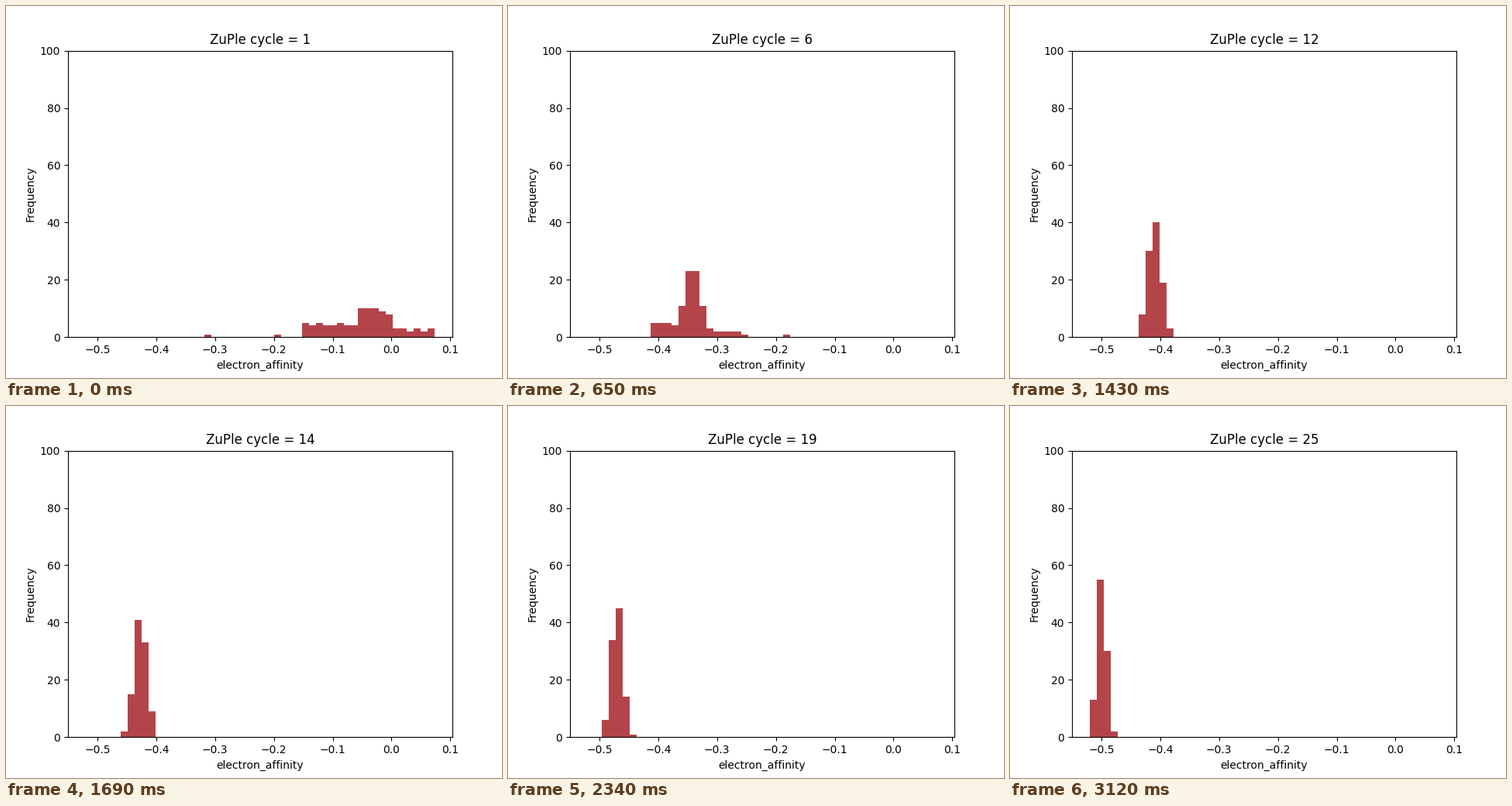
A matplotlib script that plays this animation: 640 px wide and 480 px high, repeating every 3250 ms.

```python
import numpy as np
import matplotlib.pyplot as plt
from matplotlib.animation import FuncAnimation

plt.rcParams["font.family"] = "DejaVu Sans"

CYCLES = 25
STEP_MS = 130
BINS = 50
LOW, HIGH = -0.52028, 0.07372
COLOR = "#b3444a"

RANK = np.arange(100)  # the 100 samples, sorted by value


def spread(points):
    """Sample positions, in bins, along a line through (rank, bin) points."""
    return np.interp(RANK, *zip(*points))


def bell(cycle):
    """Normal-like cluster that drifts left and narrows."""
    p = (RANK + 1) / 101
    z = (p ** 0.135 - (1 - p) ** 0.135) / 0.1975  # Tukey lambda quantile
    middle = np.interp(cycle, [10, 12, 19, 25], [10.17, 9.28, 4.2, 1.71])
    width = np.interp(cycle, [10, 25], [0.98, 0.64])
    return middle + width * z


START = spread([(0, 17.5), (1, 27.5), (2, 31), (37, 39), (76, 43),
                (84, 44), (99, 49.9)])
HALFWAY = spread([(0, 9), (19, 13), (30, 14), (76, 16), (87, 17),
                  (98, 22), (99, 28)])


def mix(a, b, u):
    return a + (b - a) * u


def samples(cycle):
    if cycle <= 6:
        u = (cycle - 1) / 5
        return mix(START, HALFWAY, 1 - (1 - u) ** 1.5)
    if cycle <= 10:
        return mix(HALFWAY, bell(10), (cycle - 6) / 4)
    return bell(cycle)


def histogram(cycle):
    # the tiny offset keeps samples on a bin edge in the upper bin
    bins = np.floor(samples(cycle) + 1e-9).astype(int)
    return np.bincount(bins, minlength=BINS)


fig, ax = plt.subplots(figsize=(6.4, 4.8), dpi=100)
step = (HIGH - LOW) / BINS
margin = 0.05 * (HIGH - LOW)
bars = ax.bar(LOW + step * np.arange(BINS), np.zeros(BINS), step,
              align="edge", color=COLOR)
ax.set_xlim(LOW - margin, HIGH + margin)
ax.set_ylim(0, 100)
ax.set_xlabel("electron_affinity")
ax.set_ylabel("Frequency")
title = ax.set_title("")


def draw(frame):
    cycle = frame + 1
    for bar, count in zip(bars, histogram(cycle)):
        bar.set_height(count)
    title.set_text(f"ZuPle cycle = {cycle}")
    return [*bars, title]


anim = FuncAnimation(fig, draw, frames=CYCLES, interval=STEP_MS,
                     repeat=True, repeat_delay=0, blit=False)
plt.show()
```
